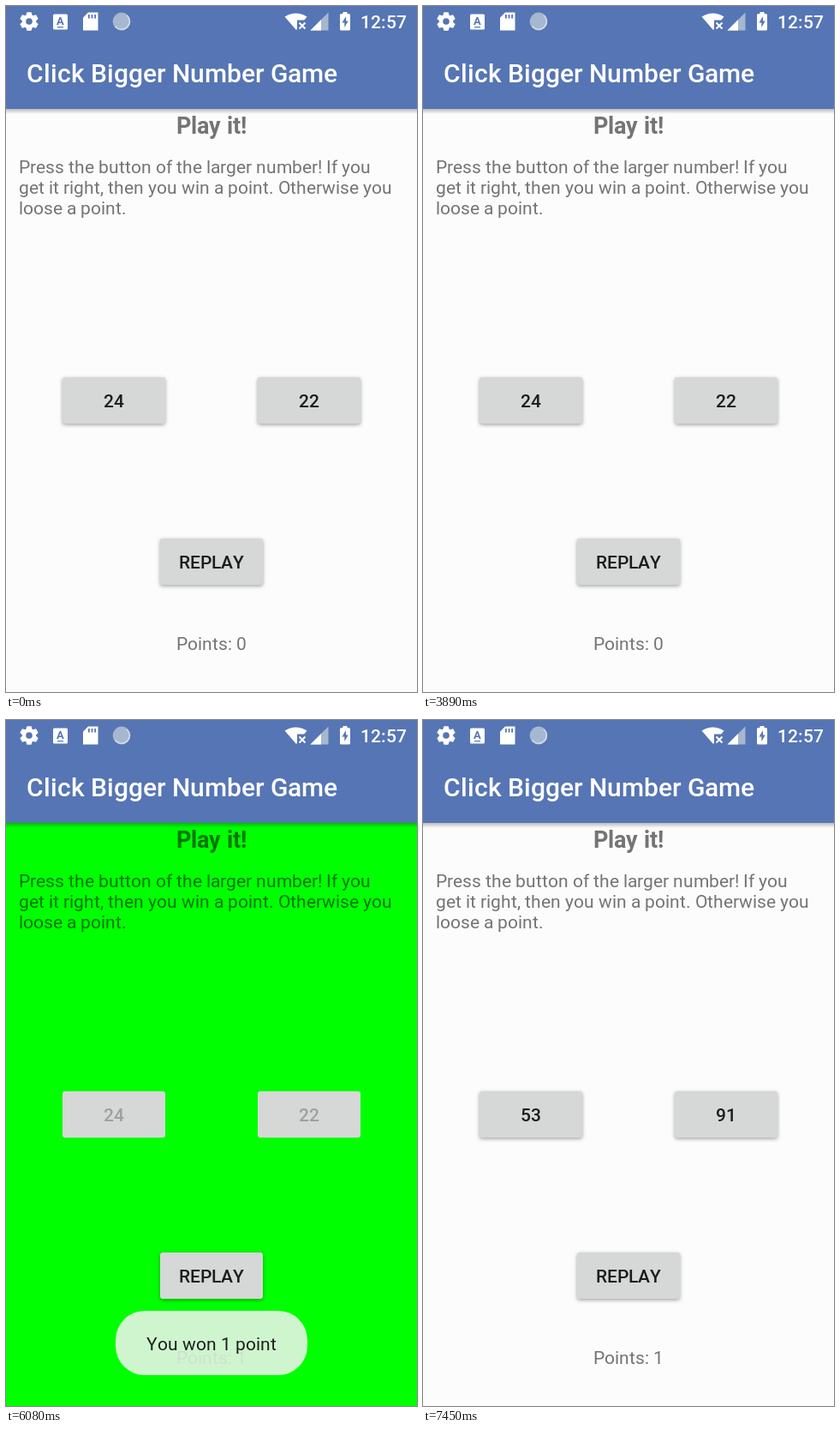
Animation, 480 px wide and 800 px high, one loop 8000 ms. Source, as an HTML page with a canvas:

```html
<!DOCTYPE html>
<html lang="en">
<head>
<meta charset="utf-8">
<title>Click Bigger Number Game</title>
<style>
html, body { margin: 0; width: 100%; height: 100%; overflow: hidden; background: #fcfcfc; }
canvas { display: block; width: 480px; height: 800px; }
</style>
</head>
<body>
<canvas id="stage" width="480" height="800"></canvas>
<script>
const ctx = document.getElementById('stage').getContext('2d');
const LOOP = 8000;
const PICK = { down: 3890, up: 4100 };
const REPLAY = { down: 6740, up: 6950 };
const TOAST = { start: 4170, end: 6080, fade: 500 };

const PLAIN = '#fcfcfc', WIN = '#00ff00', BAR = '#5675b4', WHITE = '#ffffff', DIM = '#a5b8cf';
const FACE = '#d6d7d7', INK = 'rgba(0,0,0,0.54)', LABEL = 'rgba(0,0,0,0.87)', FAINT = 'rgba(0,0,0,0.26)';

const clamp = v => Math.max(0, Math.min(1, v));
const ramp = (t, from, length) => clamp((t - from) / length);

// Glyphs advance by whole pixels, as on a device without subpixel text.
function text(str, x, y, size, color, weight = 400, centered = false) {
  ctx.font = `${weight} ${size}px Roboto, sans-serif`;
  ctx.fillStyle = color;
  const advances = [...str].map(c => Math.round(ctx.measureText(c).width));
  if (centered) x = Math.floor(x - advances.reduce((a, b) => a + b, 0) / 2);
  [...str].forEach((c, i) => {
    ctx.fillText(c, x, y);
    x += advances[i];
  });
}

function box(x, y, w, h, r, color) {
  ctx.beginPath();
  ctx.roundRect(x, y, w, h, r);
  ctx.fillStyle = color;
  ctx.fill();
}

function poly(points, color) {
  ctx.beginPath();
  for (let i = 0; i < points.length; i += 2) ctx.lineTo(points[i], points[i + 1]);
  ctx.closePath();
  ctx.fillStyle = color;
  ctx.fill();
}

function disc(x, y, r, color) {
  ctx.beginPath();
  ctx.arc(x, y, r, 0, Math.PI * 2);
  ctx.fillStyle = color;
  ctx.fill();
}

function gear(x, y) {
  ctx.save();
  ctx.translate(x, y);
  for (let i = 0; i < 6; i++) {
    poly([-4, -6, -2.6, -10.8, 2.6, -10.8, 4, -6], WHITE);
    ctx.rotate(Math.PI / 3);
  }
  disc(0, 0, 8, WHITE);
  disc(0, 0, 3.8, BAR);
  ctx.restore();
}

function wifi() {
  ctx.beginPath();
  ctx.moveTo(339, 28);
  ctx.lineTo(325.5, 12.5);
  ctx.quadraticCurveTo(338.5, 4.5, 351.5, 12.5);
  ctx.closePath();
  ctx.fillStyle = WHITE;
  ctx.fill();
  box(340, 16.5, 13, 13, 0, BAR);
  ctx.beginPath();
  ctx.moveTo(342.5, 19.5);
  ctx.lineTo(349.5, 26.5);
  ctx.moveTo(349.5, 19.5);
  ctx.lineTo(342.5, 26.5);
  ctx.strokeStyle = WHITE;
  ctx.lineWidth = 2;
  ctx.stroke();
}

function statusBar() {
  gear(27, 18);

  box(55, 9.5, 17, 18, 1.5, WHITE);
  text('A', 63.5, 22, 13, BAR, 700, true);
  box(60, 24, 7, 1.2, 0, BAR);

  poly([96, 7.5, 107.5, 7.5, 107.5, 28.5, 90, 28.5, 90, 13.5], WHITE);
  for (let i = 0; i < 3; i++) box(96 + i * 3.6, 10, 1.8, 4.5, 0, BAR);

  disc(135, 18, 10.4, DIM);
  ctx.beginPath();
  ctx.arc(135, 18, 9.3, -0.9, 2.5);
  ctx.strokeStyle = '#d3dde8';
  ctx.lineWidth = 1.5;
  ctx.stroke();

  wifi();
  poly([376.5, 7.5, 376.5, 28.5, 355.5, 28.5], DIM);
  poly([368, 16, 368, 28.5, 355.5, 28.5], WHITE);

  box(393.5, 7, 5, 4, 0, WHITE);
  box(390, 9, 12, 19.5, 1.5, WHITE);
  poly([397, 12, 392.5, 19.5, 395.3, 19.5, 395.3, 25, 399.7, 17.5, 397, 17.5], BAR);

  text('12:57', 414, 26, 21, WHITE, 500);
}

function header() {
  const fade = ctx.createLinearGradient(0, 120, 0, 126);
  fade.addColorStop(0, 'rgba(0,0,0,0.26)');
  fade.addColorStop(1, 'rgba(0,0,0,0)');
  ctx.fillStyle = fade;
  ctx.fillRect(0, 120, 480, 6);
  ctx.fillStyle = BAR;
  ctx.fillRect(0, 0, 480, 120);
  statusBar();
  text('Click Bigger Number Game', 24, 89, 30, WHITE, 500);
}

// Touch lifts the button; the ripple grows under the finger and fades on release.
function button(label, x, y, t, touch, enabled = true) {
  const lift = touch ? ramp(t, touch.down, 100) * (1 - ramp(t, touch.up, 100)) : 0;
  ctx.save();
  if (enabled) {
    ctx.shadowColor = 'rgba(0,0,0,0.36)';
    ctx.shadowBlur = 4 + lift * 8;
    ctx.shadowOffsetY = 1.5 + lift * 4;
  }
  box(x, y, 120, 54, 3, FACE);
  ctx.restore();

  if (touch) {
    const grow = ramp(t, touch.down + 70, 230);
    const alpha = 0.12 * (1 - ramp(t, touch.up, 460));
    if (grow > 0 && alpha > 0) {
      ctx.save();
      ctx.beginPath();
      ctx.roundRect(x, y, 120, 54, 3);
      ctx.clip();
      disc(x + 60, y + 27, 15 + 55 * (1 - (1 - grow) ** 2), `rgba(0,0,0,${alpha})`);
      ctx.restore();
    }
  }
  text(label, x + 60, y + 35, 21, enabled ? LABEL : FAINT, 500, true);
}

function toast(t) {
  const enter = 1 - (1 - ramp(t, TOAST.start, TOAST.fade)) ** 2;
  const leave = ramp(t, TOAST.end, TOAST.fade) ** 2;
  const alpha = enter * (1 - leave);
  if (alpha <= 0) return;
  ctx.save();
  ctx.globalAlpha = alpha;
  box(128, 689, 224, 75, 34, 'rgba(244,244,242,0.85)');
  text('You won 1 point', 240, 735, 21, LABEL, 400, true);
  ctx.restore();
}

function draw(t) {
  const won = t >= PICK.up && t < REPLAY.up;
  const [left, right] = t < REPLAY.up ? ['24', '22'] : ['53', '91'];

  ctx.fillStyle = won ? WIN : PLAIN;
  ctx.fillRect(0, 0, 480, 800);
  header();

  text('Play it!', 240, 149, 27, INK, 700, true);
  ['Press the button of the larger number! If you',
    'get it right, then you win a point. Otherwise you',
    'loose a point.'
  ].forEach((line, i) => text(line, 15, 195 + i * 24, 21, INK));

  button(left, 66, 433, t, PICK, !won);
  button(right, 294, 433, t, null, !won);
  button('REPLAY', 180, 621, t, REPLAY);
  text('Points: ' + (t < PICK.up ? 0 : 1), 240, 751, 21, INK, 400, true);
  toast(t);
}

const start = performance.now();
function tick() {
  draw((performance.now() - start) % LOOP);
  requestAnimationFrame(tick);
}
tick();
</script>
</body>
</html>
```
